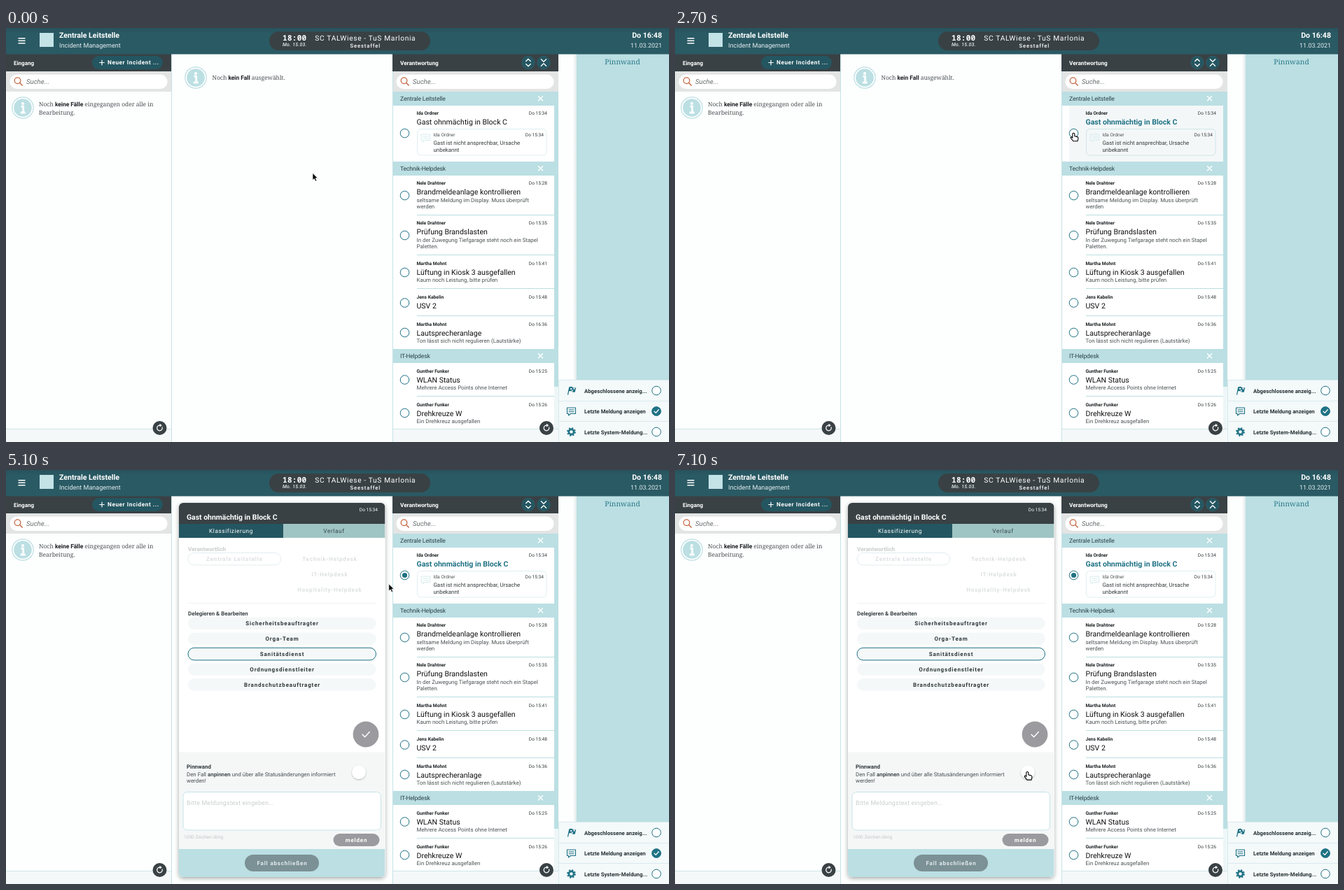
Write an HTML page that moves like this. It is 947x592 px and loops after 8000 ms.

```html
<!DOCTYPE html>
<html lang="de">
<head>
<meta charset="utf-8">
<title>Incident Management</title>
<style>
html, body { margin: 0; width: 100%; height: 100%; overflow: hidden; background: #fdfefe; }
svg { display: block; width: 100vw; height: 100vh; font-family: Roboto, sans-serif; text-rendering: geometricPrecision; }
.slab { font-family: "Noto Serif", serif; }
.mono { font-family: "Noto Sans Mono", monospace; }
.slab tspan { font-family: Roboto, sans-serif; }
</style>
</head>
<body>
<svg id="stage" viewBox="0 0 947 592" xmlns="http://www.w3.org/2000/svg"></svg>
<script>
const LOOP = 8000;
const C = {
  head: '#29586280', bar: '#394144', deep: '#245661', teal: '#1f7284', pale: '#bbdfe3',
  ink: '#1d2224', text: '#4b5254', soft: '#f5f8f9', grey: '#9b9b9f', orange: '#c56a45'
};

// Shape helpers, each returning markup
const attrs = o => Object.entries(o).map(([k, v]) => ` ${k}="${v}"`).join('');
const rect = (x, y, w, h, fill, o = {}) =>
  `<rect x="${x}" y="${y}" width="${w}" height="${h}" fill="${fill}"${attrs(o)}/>`;
const circle = (x, y, r, fill, o = {}) =>
  `<circle cx="${x}" cy="${y}" r="${r}" fill="${fill}"${attrs(o)}/>`;
const line = (d, stroke, w = 1, o = {}) =>
  `<path d="${d}" fill="none" stroke="${stroke}" stroke-width="${w}"${attrs(o)}/>`;
const group = (x, y, body, o = {}) => `<g transform="translate(${x} ${y})"${attrs(o)}>${body}</g>`;
const round = { 'stroke-linecap': 'round', 'stroke-linejoin': 'round' };
const bold = { 'font-weight': 700 };
const mid = { 'text-anchor': 'middle' };
const end = { 'text-anchor': 'end' };
const ls = n => ({ 'letter-spacing': n });

// y is the optical middle of the line
const text = (x, y, str, size, fill, o = {}) =>
  `<text x="${x}" y="${(y + size * 0.35).toFixed(2)}" font-size="${size}" fill="${fill}"${attrs(o)}>${str}</text>`;

// Icons
const chat = (color, w = 1) => line('M-6 -5H6V3.5H-1L-4 6V3.5H-6ZM-3.5 -2H3.5M-3.5 .8H3.5', color, w, round);
const cross = (x, y) => group(x, y, line('M-3.5 -3.5L3.5 3.5M3.5 -3.5L-3.5 3.5', '#fff', 1.5));
const info = (x, y) => group(x, y,
  circle(0, 0, 15.2, '#fff', { stroke: C.pale, 'stroke-width': 1.2 }) + circle(0, 0, 12.8, C.pale) +
  circle(0, -6, 2.1, '#fff') + line('M-2.5 -1.8H.7V6.8M-3.2 7H3.7', '#fff', 2.8));
const refresh = (x, y) => group(x, y, circle(0, 0, 10, C.bar) +
  line('M3.5 -1.5A3.8 3.8 0 1 1 .5 -3.8', '#fff', 1.2) +
  '<path d="M0 -6.2L3.3 -3.8L0 -1.6Z" fill="#fff"/>');
const search = x => rect(x, 62, 236, 29, '#e3e4e4') +
  rect(x + 5.5, 66.5, 225, 20.5, '#fff', { rx: 10 }) +
  group(x + 17, 76, circle(-.5, -.8, 4.3, 'none', { stroke: C.orange, 'stroke-width': 1.3 }) +
    line('M2.7 2.4L6.2 6', C.orange, 1.5, round)) +
  text(x + 29, 77, 'Suche...', 9.6, '#666b6d', { 'font-style': 'italic' });

function header() {
  const pill = rect(376, 5, 230, 27, C.bar, { rx: 13.5 }) +
    text(395, 14.5, '18:00', 11, '#fff', { class: 'mono', ...bold, ...ls(.3) }) +
    text(395, 23.5, 'Mo. 15.03.', 6.9, '#e8eeee', { 'font-style': 'italic', 'font-weight': 500, ...ls(.25) }) +
    text(513.3, 14.5, 'SC TALWiese - TuS Marlonia', 10.2, '#fff', { ...mid, ...ls(.65) }) +
    text(513.3, 25.5, 'Seestaffel', 7.6, '#fff', { ...mid, 'font-weight': 500, ...ls(.9) });
  return rect(0, 0, 947, 37.5, 'url(#head)') +
    line('M17.5 14.8H27.5M17.5 18.3H27.5M17.5 21.8H27.5', '#fff', 1.5) +
    rect(48, 7, 20, 20, '#c3e3e7') +
    text(76, 10.5, 'Zentrale Leitstelle', 10.6, '#fff', bold) +
    text(76, 24.5, 'Incident Management', 9.05, '#e4eeef') + pill +
    text(937, 10.5, 'Do 16:48', 10.6, '#fff', { ...bold, ...end }) +
    text(937, 24.5, '11.03.2021', 8.95, '#e4eeef', end);
}

function inbox() {
  return rect(0, 37, 236, 25, C.bar) + text(11, 50, 'Eingang', 8, '#fff', bold) +
    rect(123, 40, 101, 19, C.deep, { rx: 9.5 }) +
    line('M133.3 49.5H140.7M137 45.8V53.2', '#fff', 1.2) +
    text(145, 49.5, 'Neuer Incident ...', 8.3, '#fff', { ...bold, ...ls(.53) }) +
    search(0) + info(24, 114) +
    text(47, 109, 'Noch <tspan font-weight="700" fill="#1d2224">keine Fälle</tspan> eingegangen oder alle in', 8.5, C.text, { class: 'slab', ...ls(-.06) }) +
    text(47, 121, 'Bearbeitung.', 8.5, C.text, { class: 'slab', ...ls(-.06) }) +
    rect(0, 573, 236, 19, C.soft) + line('M0 573.5H236', '#cfe6e9') +
    line('M236.5 37V592', '#c5e2e6') + refresh(219.5, 572);
}

function section(y, name) {
  return rect(552, y, 231, 20, C.pale) +
    text(563, y + 10, name, 8.6, '#2d4348', ls(-.18)) + cross(763.5, y + 9.8);
}

function item(top, ring, name, time, title, subs, bottom, id) {
  return circle(569.5, ring, 6.3, '#fff', { stroke: C.teal }) +
    text(586.5, top, name, 6.7, C.ink, bold) +
    text(773, top, time, 6.6, '#33393b', end) +
    text(586.5, top + 12.7, title, 10.55, '#111', id ? { id } : {}) +
    subs.map((s, i) => text(586.5, top + 24 + i * 9.3, s, 7.9, C.text)).join('') +
    (bottom ? line(`M587 ${bottom}.5H783`, C.pale) : '');
}

function duties() {
  const chevrons = (x, d) => circle(x, 49.5, 9.2, C.deep, { stroke: '#326873', 'stroke-width': .6 }) +
    group(x, 49.5, line(d, '#fff', 1.3, round));
  const note = rect(587.5, 144.5, 184.5, 37.5, '#fff', { rx: 5, stroke: '#e0eff1', id: 'note' }) +
    group(599.5, 157, chat('#d5ebee')) +
    text(610.5, 152.5, 'Ida Ordner', 6.7, C.text) + text(768, 152.5, 'Do 15:34', 6.6, '#33393b', end) +
    text(610.5, 164.5, 'Gast ist nicht ansprechbar, Ursache', 7.9, '#33393b') +
    text(610.5, 173.8, 'unbekannt', 7.9, '#33393b');
  return rect(552, 37, 237, 555, '#fff') + rect(552, 37, 237, 25, C.bar) +
    text(563, 50, 'Verantwortung', 8.2, '#fff', bold) +
    chevrons(746, 'M-3.3 -2L0 -5.3L3.3 -2M-3.3 2L0 5.3L3.3 2') +
    chevrons(768, 'M-3.6 -4.8L0 -1.2L3.6 -4.8M-3.6 4.8L0 1.2L3.6 4.8') +
    search(552) + rect(788, 62, 1, 29, '#e3e4e4') +
    rect(783, 91, 6, 482, '#eef6f7') + rect(783, 91, 6, 422, C.pale) +
    section(91, 'Zentrale Leitstelle') +
    rect(563, 111, 220, 80, '#f4f7f8', { id: 'hover' }) +
    item(122, 150.5, 'Ida Ordner', 'Do 15:34', 'Gast ohnmächtig in Block C', [], 0, 'case') +
    circle(569.5, 150.5, 3.6, C.teal, { id: 'dot' }) + note +
    section(191, 'Technik-Helpdesk') +
    item(222, 239.5, 'Nele Drahtner', 'Do 15:28', 'Brandmeldeanlage kontrollieren',
      ['seltsame Meldung im Display. Muss überprüft', 'werden'], 267) +
    item(279, 296.5, 'Nele Drahtner', 'Do 15:35', 'Prüfung Brandslasten',
      ['In der Zuwegung Tiefgarage steht noch ein Stapel', 'Paletten.'], 324) +
    item(336.5, 349.5, 'Martha Mohnt', 'Do 15:41', 'Lüftung in Kiosk 3 ausgefallen', ['Kaum noch Leistung, bitte prüfen'], 372) +
    item(384.5, 393, 'Jens Kabelin', 'Do 15:48', 'USV 2', [], 411) +
    item(423.5, 435.5, 'Martha Mohnt', 'Do 16:36', 'Lautsprecheranlage', ['Ton lässt sich nicht regulieren (Lautstärke)'], 0) +
    section(459, 'IT-Helpdesk') +
    item(490.5, 503, 'Gunther Funker', 'Do 15:25', 'WLAN Status', ['Mehrere Access Points ohne Internet'], 526) +
    item(538.5, 550.5, 'Gunther Funker', 'Do 15:26', 'Drehkreuze W', ['Ein Drehkreuz ausgefallen'], 0) +
    rect(552, 573, 237, 19, C.soft) + line('M552 573.5H789', '#cfe6e9') +
    line('M552.5 62V592', '#c5e2e6') + refresh(772, 572);
}

function pinboard() {
  const flag = line('M-5 6L-2.6 -5', C.teal, 1.2) +
    '<path d="M-2.8 -5Q0 -6.5 2 -4.8T6.8 -4.6L5.3 2Q3 2.8 1 1.4T-4 1Z" fill="#1f7284"/>' +
    line('M-1.4 -2.6H.8M3 -2.8H5M.2 .2H2.2', '#fff', 1.7);
  const gear = circle(0, 0, 3.6, 'none', { stroke: C.teal, 'stroke-width': 2.6 }) +
    circle(0, 0, 5.5, 'none', { stroke: C.teal, 'stroke-width': 1.8, 'stroke-dasharray': '2.16 2.16' });
  const option = (y, label, icon) => group(807.5, y, icon) +
    text(826, y + .5, label, 7.75, '#263134', bold) +
    circle(929, y, 6.3, '#fff', { stroke: C.teal });
  return rect(789, 37, 26, 466, '#fdfefe') + rect(810, 37, 5, 466, 'url(#edge)') +
    rect(815, 37, 132, 466, C.pale) +
    text(880.5, 48, 'Pinnwand', 10.2, '#2a7888', { class: 'slab', ...mid, ...ls(.1) }) +
    rect(789, 503, 158, 89, '#f4f9fa') +
    line('M789 503.5H947M789 533.5H947M789 562.5H947', '#d9ebee') + line('M789.5 503V592', '#d9ebee') +
    option(518.5, 'Abgeschlossene anzeig...', flag) +
    option(548, 'Letzte Meldung anzeigen', chat(C.teal, 1.1)) +
    option(577.5, 'Letzte System-Meldung...', gear) +
    circle(929, 548, 6.6, C.teal) + line('M926 548.2L928.2 550.4L932.2 545.8', '#fff', 1.3, round);
}

function detail() {
  const label = (x, y, s, fill) => text(x, y, s, 8, fill, { ...bold, ...mid, ...ls(.83) });
  const roles = ['Sicherheitsbeauftragter', 'Orga-Team', 'Sanitätsdienst', 'Ordnungsdienstleiter', 'Brandschutzbeauftragter'];
  const faint = '#dcdfe0';
  const inner = rect(247, 47, 294.5, 535, '#fff') + rect(247, 47, 294.5, 30, C.bar) +
    text(258, 67, 'Gast ohnmächtig in Block C', 10.45, '#fff', { ...bold, id: 'title' }) +
    text(531, 56.5, 'Do 15:34', 6.6, '#fff', end) +
    rect(247, 77, 149, 20, C.deep) + rect(396, 77, 145.5, 20, '#9fc4c4') +
    text(321.5, 87, 'Klassifizierung', 8.3, '#fff', { ...mid, ...ls(.57) }) +
    text(468.5, 87, 'Verlauf', 8.3, '#35484c', { ...mid, ...ls(.6) }) +
    text(260, 113, 'Verantwortlich', 8.2, '#c9cccd', bold) +
    rect(260, 118.5, 132.5, 17.5, '#fff', { rx: 8.7, stroke: '#e2edef' }) +
    label(326.5, 127.5, 'Zentrale Leitstelle', faint) +
    ['Technik-Helpdesk', 'IT-Helpdesk', 'Hospitality-Helpdesk'].map((s, i) => label(462.5, 127.5 + 22 * i, s, faint)).join('') +
    line('M260 190.5H529', '#f0f3f4') +
    text(260, 205, 'Delegieren &amp; Bearbeiten', 7.9, '#3a4345', bold) +
    roles.map((s, i) => {
      const y = 219.3 + 21.9 * i;
      return rect(260, y - 8.8, 268.5, 17.6, '#f5f8f8', { rx: 8.8, stroke: i === 2 ? C.teal : 'none' }) +
        label(394.5, y, s, '#2d373a');
    }).join('') +
    circle(514, 378, 18.4, C.grey) + line('M509 378.3L512.6 381.8L519.3 374.5', '#fff', 1.4, round) +
    rect(247, 403.5, 294.5, 139, '#f5f7f7') +
    text(258, 424, 'Pinnwand', 7.9, '#30393b', bold) +
    text(258, 435, 'Den Fall <tspan font-weight="700">anpinnen</tspan> und über alle Statusänderungen informiert', 7.9, '#454d4f') +
    text(258, 444.3, 'werden!', 7.9, '#454d4f') +
    circle(504, 432.3, 9.8, '#fff', { filter: 'url(#knob)' }) +
    rect(253, 460.5, 282.5, 54.5, '#fff', { rx: 6, stroke: '#c5e3e7' }) +
    text(258, 475.5, 'Bitte Meldungstext eingeben...', 8.8, '#c9cdce', ls(.2)) +
    text(254, 524.5, '1000 Zeichen übrig', 6.6, '#c2c6c7') +
    rect(467.5, 520, 66, 18, C.grey, { rx: 9 }) + label(500.5, 529.3, 'melden', '#fff') +
    rect(247, 542, 294.5, 40, C.pale) +
    rect(341, 550, 106, 24, '#7c9195', { rx: 12 }) + label(394.5, 562, 'Fall abschließen', '#e2ecee');
  return rect(247, 47, 294.5, 535, '#fff', { rx: 6, filter: 'url(#drop)' }) +
    `<g clip-path="url(#card)">${inner}</g>`;
}

const stage = document.getElementById('stage');
stage.innerHTML = `<defs>
  <linearGradient id="head" x2="0" y2="1"><stop stop-color="#27525c"/><stop offset=".2" stop-color="#2a5a64"/><stop offset="1" stop-color="#2a5a64"/></linearGradient>
  <linearGradient id="edge"><stop stop-color="#fdfefe"/><stop offset="1" stop-color="#dfe9ea"/></linearGradient>
  <filter id="drop" x="-10%" y="-10%" width="120%" height="120%"><feDropShadow dx="0" dy="2" stdDeviation="3" flood-opacity=".35"/></filter>
  <filter id="knob" x="-50%" y="-50%" width="200%" height="200%"><feDropShadow dx="0" dy="1" stdDeviation="1.2" flood-opacity=".3"/></filter>
  <clipPath id="card"><rect x="247" y="47" width="294.5" height="535" rx="6"/></clipPath>
</defs>` +
  rect(0, 0, 947, 592, '#fdfefe') + inbox() +
  `<g id="empty">${info(271, 71)}${text(294.5, 71.5, 'Noch <tspan font-weight="700" fill="#1d2224">kein Fall</tspan> ausgewählt.', 8.5, C.text, { class: 'slab', ...ls(-.06) })}</g>` +
  `<g id="detail">${detail()}</g>` + duties() + pinboard() + header() +
  `<g id="cursor">
    <path id="arrow" d="M0 0V10L2.3 7.9L4 11.6L5.8 10.8L4.1 7.2H7.2Z" fill="#000" stroke="#fff" stroke-width=".7"/>
    <path id="hand" d="M-1.5 1.2Q0 -.8 1.5 1.2V4.6L5.4 5.6Q7 6.2 6.6 8.2L5.7 11.8H-.4L-4 7.4Q-4.2 5.6 -2.8 5.9L-1.5 7Z" fill="#fff" stroke="#000" stroke-width="1.1"/>
  </g>`;

const el = id => document.getElementById(id);
const show = (id, on) => el(id).setAttribute('display', on ? 'inline' : 'none');
const set = (id, o) => { for (const k in o) el(id).setAttribute(k, o[k]); };

// Pointer stops: time, x, y
const path = [
  [0, 438, 207.5], [900, 438, 207.5], [1700, 565.7, 151.7], [1900, 569.3, 150],
  [4900, 569.3, 150], [5100, 546.8, 163], [5500, 483, 349.7],
  [6500, 531, 534.5], [6700, 531, 534.5], [7100, 503.3, 431.3], [LOOP, 503.3, 431.3]
];

function pointer(t) {
  const i = path.findIndex((p, n) => n && t < p[0]);
  const [t0, x0, y0] = path[i - 1], [t1, x1, y1] = path[i];
  let u = (t - t0) / (t1 - t0);
  if (t1 - t0 > 600) u = u * u * (3 - 2 * u);
  return [x0 + (x1 - x0) * u, y0 + (y1 - y0) * u];
}

function draw(ms) {
  const t = ms < 100 ? 0 : Math.floor((ms - 100) / 200) * 200 + 100;
  const open = t >= 3700;
  const hover = t >= 1900 && t < 5100;
  const hand = hover || t >= 7100;
  const active = hover || open;
  const [x, y] = pointer(t);
  show('empty', !open);
  show('detail', open);
  show('dot', open);
  show('hover', hover);
  show('arrow', !hand);
  show('hand', hand);
  set('case', { fill: active ? C.teal : '#111', 'font-weight': active ? 700 : 400 });
  set('note', { fill: hover ? '#f4f7f8' : '#fff', stroke: hover ? '#cfe6e9' : '#e0eff1' });
  set('title', { 'font-size': t < 3900 ? 11.2 : 10.45 });
  set('cursor', { transform: `translate(${x.toFixed(2)} ${y.toFixed(2)})` });
}

const start = performance.now();
function tick() {
  draw((performance.now() - start) % LOOP);
  requestAnimationFrame(tick);
}
tick();
</script>
</body>
</html>
```
